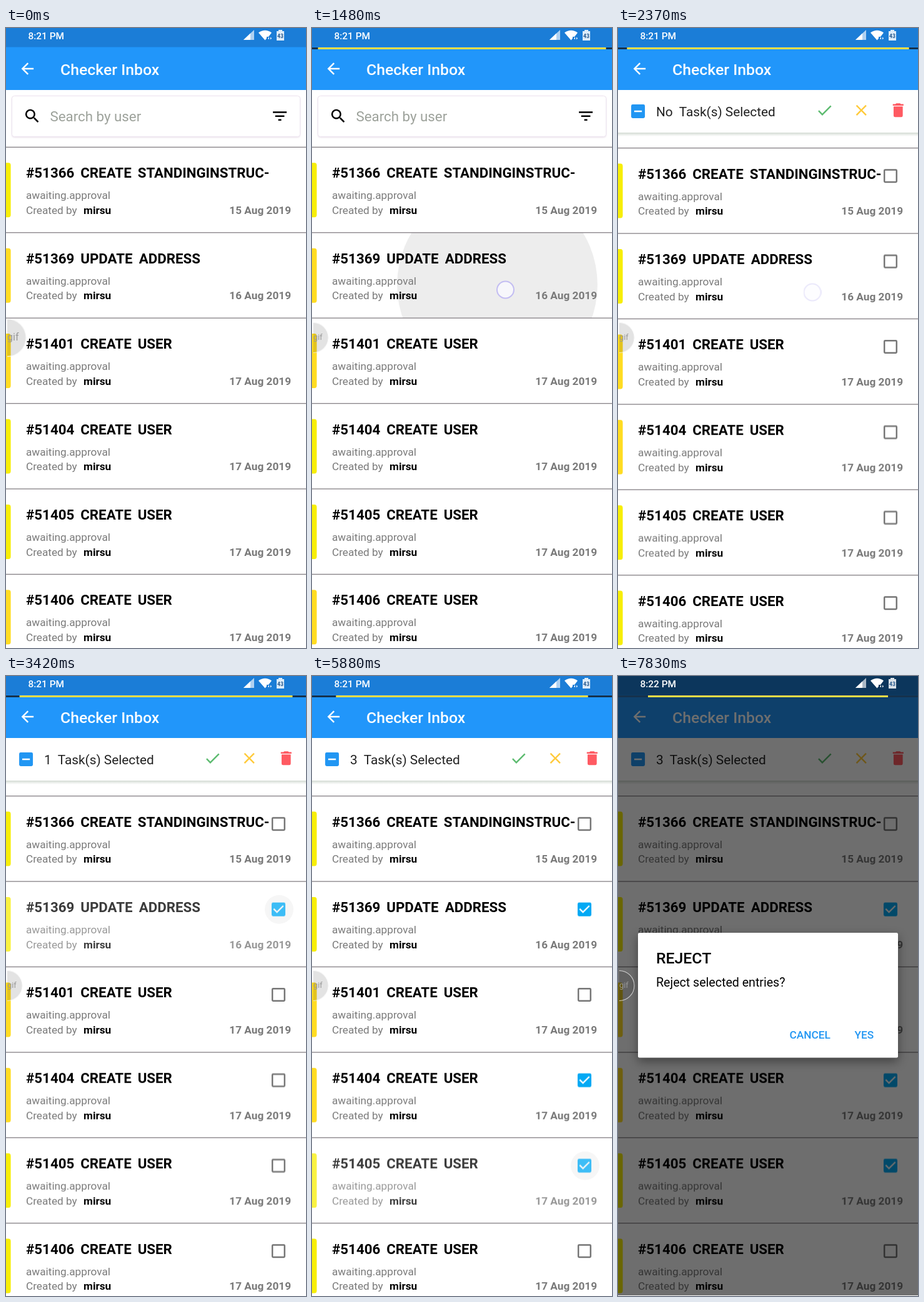
Write an HTML page that moves like this. It is 480 by 990 pixels and loops after 8 s.

```html
<!DOCTYPE html>
<html lang="en">
<head>
<meta charset="utf-8">
<title>Checker Inbox</title>
<style>
  html, body { margin: 0; width: 100%; height: 100%; overflow: hidden; background: #fff; }
  svg { display: block; width: 100vw; height: 100vh; }
  text { font-family: Roboto, sans-serif; white-space: pre; }
  .bold { font-weight: 700; }
  .medium { font-weight: 500; }
  .title { font-size: 24.8px; }
  .heading { font-size: 22.3px; }
  .small { font-size: 17.2px; }
  .grey { fill: #7a7a7a; }
  .count { font-size: 20.8px; fill: #222; }
  .button { font-size: 17.3px; fill: #2196f3; }
  .clock { font-size: 15.4px; }
  .touch { fill: #fafaff; fill-opacity: .75; stroke: #c3bdf2; stroke-width: 2; }
  #line { transform-origin: 240px 0; }
  #bubble { transform-origin: 2px 494px; }
  #dialog { transform-origin: 240px 510px; }
  #panel { filter: drop-shadow(0 6px 8px rgba(0, 0, 0, .4)); }
  #card { filter: drop-shadow(0 1px 1px rgba(80, 0, 80, .12)); }
</style>
</head>
<body>
<svg id="stage" viewBox="0 0 480 990" preserveAspectRatio="none">
  <defs>
    <clipPath id="rowClip"><rect x="0" y="327" width="480" height="136"/></clipPath>
    <linearGradient id="fade" x2="0" y2="1">
      <stop stop-color="#d3dbd3"/><stop offset="1" stop-color="#fff"/>
    </linearGradient>
  </defs>

  <rect width="480" height="31" fill="#1b7dd7"/>
  <g id="appBar">
    <rect y="30.5" width="480" height="68.5" fill="#2196fa"/>
    <text class="title medium" x="87" y="74.7" fill="#fff">Checker Inbox</text>
  </g>

  <g id="searchBar">
    <rect id="card" x="9.5" y="108.5" width="461" height="65" rx="4" fill="#fff" stroke="#ece3ef"/>
    <text x="70.5" y="149" font-size="22.3" fill="#9da29b">Search by user</text>
  </g>
  <g id="selectBar">
    <rect y="167" width="480" height="6" fill="url(#fade)"/>
  </g>

  <g clip-path="url(#rowClip)"><circle id="ripple" fill="#000" fill-opacity=".07"/></g>
  <g id="inbox"></g>
  <g id="selection"></g>

  <rect id="dim" width="480" height="989" fill="#000"/>
  <g id="dialog">
    <rect id="panel" x="32" y="410" width="416" height="199.5" rx="2.5" fill="#fff"/>
    <text class="title medium" x="61" y="458.5">REJECT</text>
    <text x="61" y="495.5" font-size="19.6">Reject selected entries?</text>
    <text class="button medium" x="274.5" y="578.5">CANCEL</text>
    <text class="button medium" x="378.5" y="578.5">YES</text>
  </g>

  <g id="status" fill="#fff">
    <text id="before" class="clock medium" x="35.5" y="18.3">8:21 PM</text>
    <text id="after" class="clock medium" x="35.5" y="18.3">8:22 PM</text>
    <path d="M397 3V19H380Z" opacity=".65"/>
    <path d="M391 8.6V19H380Z"/>
    <path d="M404 7.5Q414.5 0 425 7.5L420 14H417V16.5L414.5 19.5Z"/>
    <path d="M419 16.5l2-2v4zM425 16.5l-2-2v4z"/>
    <path d="M436 3h6v2h3v15h-12V5h3z" opacity=".85"/>
    <text class="bold" x="434" y="15.5" font-size="8.5" fill="#24578c">43</text>
  </g>

  <g id="progress">
    <rect y="31" width="480" height="3" fill="#15314c"/>
    <rect id="line" y="31" width="480" height="3" fill="#ffdd45"/>
  </g>
  <g id="bubble">
    <path d="M2 464A30.5 30.5 0 0 1 2 525Z" fill="#000" fill-opacity=".11"/>
    <path d="M2 464.5A30 30 0 0 1 2 524.5" fill="none" stroke="#fff" stroke-opacity=".7" stroke-width="1.3"/>
    <text x="2" y="499" font-size="16" fill="#989898">gif</text>
  </g>
</svg>

<script>
const LOOP = 8000, PITCH = 136.4, SCALE = 1.2222, GAP = 10;
const $ = id => document.getElementById(id);

const ICONS = {
  back: 'M20 11H7.83l5.59-5.59L12 4l-8 8 8 8 1.41-1.41L7.83 13H20z',
  search: 'M15.5 14h-.79l-.28-.27A6.5 6.5 0 1 0 13.73 14.43l.27.28v.79l5 4.99L20.49 19zm-6 0a4.5 4.5 0 1 1 0-9 4.5 4.5 0 0 1 0 9z',
  filter: 'M10 18h4v-2h-4zM3 6v2h18V6zm3 7h12v-2H6z',
  check: 'M9 16.17L4.83 12l-1.42 1.41L9 19 21 7l-1.41-1.41z',
  close: 'M19 6.41L17.59 5 12 10.59 6.41 5 5 6.41 10.59 12 5 17.59 6.41 19 12 13.41 17.59 19 19 17.59 13.41 12z',
  trash: 'M6 19a2 2 0 0 0 2 2h8a2 2 0 0 0 2-2V7H6zM19 4h-3.5l-1-1h-5l-1 1H5v2h14z',
  partial: 'M19 3H5a2 2 0 0 0-2 2v14a2 2 0 0 0 2 2h14a2 2 0 0 0 2-2V5a2 2 0 0 0-2-2zm-2 10H7v-2h10z',
  blank: 'M19 5v14H5V5h14m0-2H5a2 2 0 0 0-2 2v14a2 2 0 0 0 2 2h14a2 2 0 0 0 2-2V5a2 2 0 0 0-2-2z',
  checked: 'M19 3H5a2 2 0 0 0-2 2v14a2 2 0 0 0 2 2h14a2 2 0 0 0 2-2V5a2 2 0 0 0-2-2zm-9 14l-5-5 1.41-1.41L10 14.17l7.59-7.59L19 8z'
};

function add(parent, tag, attrs = {}, content = '') {
  const node = document.createElementNS('http://www.w3.org/2000/svg', tag);
  for (const key in attrs) node.setAttribute(key, attrs[key]);
  node.textContent = content;
  return parent.appendChild(node);
}

const icon = (parent, name, x, y, fill) =>
  add(parent, 'path', { d: ICONS[name], fill, transform: `translate(${x} ${y}) scale(${SCALE})` });

// Words set apart by a fixed margin instead of spaces.
function words(parent, list, attrs) {
  const text = add(parent, 'text', attrs);
  list.forEach((word, i) => add(text, 'tspan', { dx: i ? GAP : 0 }, word));
  return text;
}

// frames: [time in ms, properties]
function track(node, frames, easing = 'linear') {
  const all = [...frames, [LOOP, frames.at(-1)[1]]];
  node.animate(all.map(([time, props]) => ({ easing, ...props, offset: time / LOOP })),
    { duration: LOOP, iterations: Infinity });
}
const fade = (node, pairs, easing) =>
  track(node, pairs.map(([time, opacity]) => [time, { opacity }]), easing);
const show = (node, from, to = LOOP) =>
  fade(node, from ? [[0, 0], [from, 1], [to, 0]] : [[0, 1], [to, 0]], 'step-end');

const tasks = [
  ['#51366', 'CREATE', 'STANDINGINSTRUC-', 15],
  ['#51369', 'UPDATE', 'ADDRESS', 16],
  ['#51401', 'CREATE', 'USER', 17],
  ['#51404', 'CREATE', 'USER', 17],
  ['#51405', 'CREATE', 'USER', 17],
  ['#51406', 'CREATE', 'USER', 17]
];

function buildList(list, top, amberRows) {
  return tasks.map(([id, action, entity, day], i) => {
    const y = top + i * PITCH;
    add(list, 'rect', { y: y - .6, width: 480, height: 1.3, fill: '#858085' });
    const row = add(list, 'g', { transform: `translate(0 ${y})` });
    add(row, 'path', {
      d: 'M0 25H4Q7.6 25 7.6 29V108Q7.6 112 4 112H0Z',
      fill: amberRows.includes(i) ? '#ffdc22' : '#f7ee08'
    });
    words(row, [id, action, entity], { class: 'heading bold', x: 32, y: 49 });
    add(row, 'text', { class: 'small grey', x: 32, y: 83 }, 'awaiting.approval');
    add(row, 'text', { class: 'small grey', x: 32, y: 106.7 }, 'Created by');
    add(row, 'text', { class: 'small bold', x: 124, y: 106.7 }, 'mirsu');
    add(row, 'text', { class: 'small bold grey', x: 456, y: 106.7, 'text-anchor': 'end' }, `${day} Aug 2019`);
    return row;
  });
}

icon($('appBar'), 'back', 19.7, 50.4, '#fff');
icon($('searchBar'), 'search', 27.3, 126, '#000');
icon($('searchBar'), 'filter', 423.4, 126, '#000');
icon($('selectBar'), 'partial', 17.4, 118.4, '#2196f3');
icon($('selectBar'), 'check', 315.9, 116.7, '#5dbb70');
icon($('selectBar'), 'close', 374.6, 116.7, '#ffca3a');
icon($('selectBar'), 'trash', 433.6, 116.7, '#ff5a62');

// Inbox, then selection mode after the long press
const SWITCH = 2050;
buildList($('inbox'), 190.3, [1, 2, 5]);
const rows = buildList($('selection'), 191.6, [2, 3]);
for (const id of ['inbox', 'searchBar']) show($(id), 0, SWITCH);
for (const id of ['selection', 'selectBar']) show($(id), SWITCH);

const spread = (cx, cy, r, opacity = 1) => ({ cx: cx + 'px', cy: cy + 'px', r: r + 'px', opacity });
track($('ripple'), [
  [0, spread(309, 418, 0)],
  [1160, spread(306, 416, 10)],
  [1480, spread(296.5, 410, 160)],
  [1880, spread(285, 403, 300)],
  [2050, spread(285, 403, 300)],
  [2290, spread(285, 403, 300, 0)]
]);

// Ticking rows: [row, press, release, middle of cross-fade, end]
const taps = [
  [1, 2910, 3250, 3420, 3560],
  [3, 4290, 4400, 4560, 4700],
  [4, 5290, 5700, 5880, 6120]
];
const boxes = rows.map(row => icon(row, 'blank', 421.3, 30, '#757575'));
taps.forEach(([index, press, release, middle, end]) => {
  const row = rows[index];
  const halo = add(row, 'circle', { cx: 437, cy: 44.7, r: 23 });
  row.insertBefore(halo, boxes[index]);
  const tick = icon(row, 'checked', 421.3, 30, '#03a9f4');
  fade(halo, [[0, 0], [press, 0], [release, .1], [middle, .05], [end, 0]]);
  fade(tick, [[0, 0], [release, 0], [middle, 1]]);
  fade(boxes[index], [[0, 1], [release, 1], [middle, 0]]);
  track(row, [
    [0, { opacity: 1 }], [release, { opacity: 1 }],
    [middle, { opacity: .77, easing: 'step-end' }], [end, { opacity: 1 }]
  ]);
});

const changes = [SWITCH, ...taps.map(tap => tap[2]), LOOP];
['No', '1', '2', '3'].forEach((count, i) =>
  show(words($('selectBar'), [count, 'Task(s) Selected'], { class: 'count', x: 61, y: 141 }),
    changes[i], changes[i + 1]));

// Finger marks: [x, y, down, up, gone]
[
  [309.5, 418, 1040, 2210, 2710],
  [442, 372, 2910, 3200, 3330],
  [442.5, 640.5, 3860, 4290, 4400],
  [441, 778, 5290, 5620, 5740],
  [391, 119, 6940, 7580, 7740]
].forEach(([cx, cy, down, up, gone], i) => {
  const mark = add($('stage'), 'circle', { class: 'touch', cx, cy, r: 13.5 });
  fade(mark, [[0, 0], [down, 1], [up, i < 4 ? .35 : .55], [gone, 0]], 'step-end');
  if (!i) track(mark, [[0, { transform: 'none' }], [SWITCH, { transform: 'translate(1.5px, 4px)' }]], 'step-end');
});

// Recorder line loses one percent at a time
const ticks = [100, 450, 740, 1040, 1700, 2130, 2710, 2990, 3280, 3560,
  3860, 4290, 4700, 4990, 5290, 5590, 6120, 6420, 6720, 7020];
show($('progress'), ticks[0]);
track($('line'), [0, ...ticks].map((time, i) => [time, { transform: `scaleX(${1 - i / 100})` }]), 'step-end');
track($('bubble'), [[0, 1], [100, .9], [220, .8]].map(([t, s]) => [t, { transform: `scale(${s})` }]), 'step-end');

// Clock and dialog
show($('before'), 0, 7100);
show($('after'), 7100);
fade($('dim'), [[0, 0], [7740, .28], [7830, .57]], 'step-end');
track($('dialog'), [
  [0, { opacity: 0, transform: 'scale(.95)' }],
  [7740, { opacity: .5, transform: 'scale(.97)' }],
  [7830, { opacity: 1, transform: 'none' }]
], 'step-end');
</script>
</body>
</html>
```
